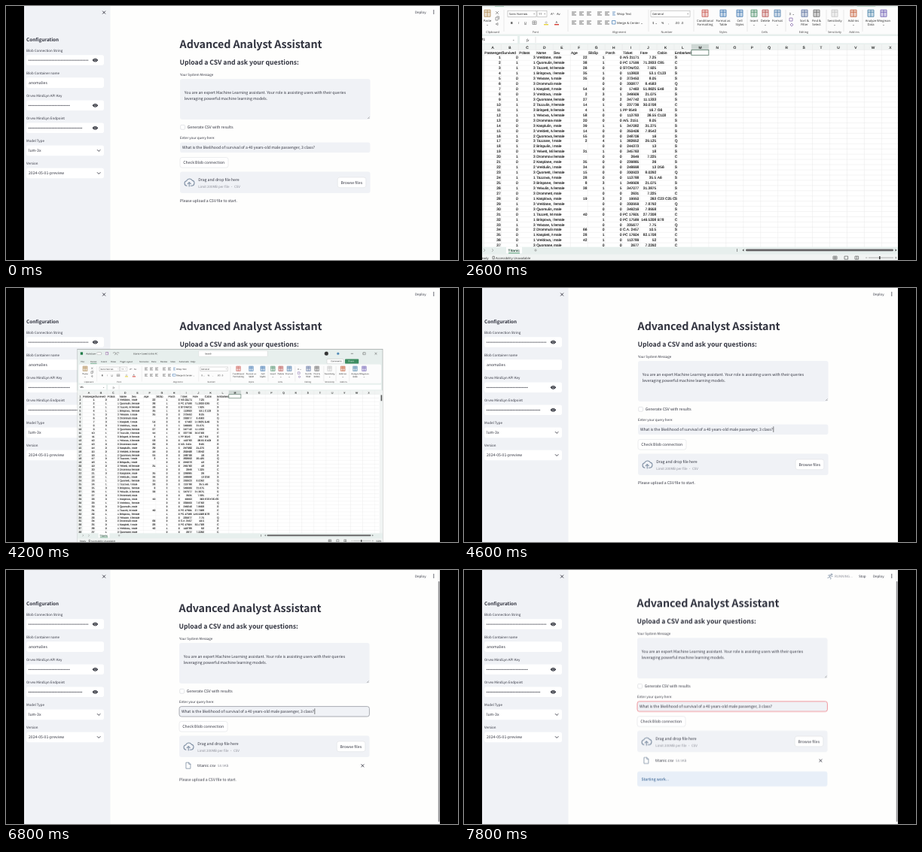
Write an HTML page that moves like this. It is 600 px wide and 338 px high and loops after 8000 ms.

```html
<!DOCTYPE html>
<html lang="en">
<head>
<meta charset="utf-8">
<title>Analyst assistant demo</title>
<style>
html, body { margin: 0; width: 100%; height: 100%; overflow: hidden; background: #000; }
svg { display: block; width: 100%; height: 100%; }
text { white-space: pre; text-rendering: geometricPrecision; }
#app { font-family: "Noto Sans CJK SC", "Noto Sans CJK JP", "Noto Sans CJK", "Open Sans", sans-serif; font-size: 5.14px; fill: #31333f; }
#app .h1 { font-size: 14.25px; font-weight: 700; letter-spacing: -.005em; }
#app .h3 { font-size: 8.65px; font-weight: 600; }
#app .h4 { font-size: 6.35px; font-weight: 600; }
#app .sm { font-size: 4.48px; }
#app .dim { font-size: 4.48px; fill: #8b8d97; }
.field { fill: #f0f2f6; }
.btn { fill: #fff; stroke: #d9dade; stroke-width: .5; }
.ico { fill: none; stroke: #31333f; stroke-width: .9; stroke-linecap: round; stroke-linejoin: round; }
.soft { stroke: #8191a5; stroke-width: .8; }

#excel { font-family: "Liberation Sans", Arial, sans-serif; font-size: 4.8px; fill: #111; transform-origin: 281px 339.5px; }
#excel .cells text { stroke: #111; stroke-width: .12; }
#excel .ui { font-family: "Open Sans", sans-serif; font-size: 4.1px; fill: #222; }
#excel .grp { font-family: "Open Sans", sans-serif; font-size: 3.9px; fill: #444; }
#excel .mid { text-anchor: middle; }
#excel .end { text-anchor: end; }

.t { animation: 8s -10ms step-end infinite; }
#main { animation-name: main; }
#link1 { animation-name: link1; }
#link2 { animation-name: link2; }
#excel { animation-name: excel; }
#caret { animation-name: caret; }
#ghost { animation-name: ghost; }
#deny { animation-name: deny; }
#bar, #file { animation-name: loaded; }
#hint { animation-name: hint; }
#ring { animation-name: ring; }
#run { animation-name: run; }
#info { animation-name: info; }
@keyframes main { 0% { transform: none; } 82.5% { transform: translate(-1px, 0); } 97.5%, 100% { transform: translate(-1px, -6.7px); } }
@keyframes link1 { 0%, 20%, 100% { opacity: 0; } 17.5% { opacity: .6; } }
@keyframes link2 { 0%, 25%, 100% { opacity: 0; } 22.5% { opacity: .6; } }
@keyframes excel {
  0%, 57.5%, 100% { opacity: 0; transform: none; }
  32.5% { opacity: 1; transform: none; }
  47.5% { opacity: 1; transform: scale(.96); }
  50% { opacity: 1; transform: scale(.85); }
  52.5% { opacity: 1; transform: scale(.704); }
  55% { opacity: .5; transform: scale(.5); }
}
@keyframes caret { 0%, 62.5%, 90%, 100% { opacity: 0; } 57.5%, 85% { opacity: 1; } }
@keyframes ghost {
  0%, 80%, 100% { opacity: 0; transform: none; }
  67.5% { opacity: 1; transform: none; }
  75% { opacity: 1; transform: translate(-22px, 30px); }
  77.5% { opacity: 1; transform: translate(-50px, 64px); }
}
@keyframes deny { 0% { opacity: 1; } 77.5%, 100% { opacity: 0; } }
@keyframes loaded { 0% { opacity: 0; } 82.5%, 100% { opacity: 1; } }
@keyframes hint { 0% { opacity: 1; transform: none; } 82.5% { opacity: 1; transform: translate(0, 19.7px); } 97.5%, 100% { opacity: 0; } }
@keyframes ring { 0% { stroke: transparent; } 85% { stroke: #9698a0; } 92.5%, 100% { stroke: #ee7b83; } }
@keyframes run { 0% { opacity: 0; } 95%, 100% { opacity: 1; } }
@keyframes info { 0% { opacity: 0; } 97.5%, 100% { opacity: 1; } }
</style>
</head>
<body>
<svg viewBox="0 0 600 338" preserveAspectRatio="none">
  <defs>
    <clipPath id="nameCol"><rect x="95.4" y="58" width="22.6" height="264"/></clipPath>
    <g id="chain" class="ico" style="stroke:#777985;stroke-width:.8">
      <path d="M-.6 .9a1.5 1.5 0 0 1 0-2.1l1-1a1.5 1.5 0 0 1 2.1 2.1l-.5.5M.6-.9a1.5 1.5 0 0 1 0 2.1l-1 1a1.5 1.5 0 0 1-2.1-2.1l.5-.5"/>
    </g>
  </defs>
  <g id="app">
    <rect x="24" width="552" height="338" fill="#fefefd"/>
    <rect x="24" width="114.5" height="338" fill="#f0f2f6"/>
    <path class="ico" d="M128.4 6.9l3.4 3.4m0-3.4l-3.4 3.4"/>
    <text class="h4" x="27" y="47.4">Configuration</text>
    <g id="fields"></g>

    <text class="sm" x="543" y="9.7">Deploy</text>
    <path d="M567.8 6v4.2" stroke="#31333f" stroke-width="1.3" stroke-linecap="round" stroke-dasharray="0 2"/>
    <g id="run" class="t">
      <g class="ico soft"><circle cx="487.8" cy="5.9" r=".9"/><path d="M483.5 7.2l2.4-.4 1.4 1.4 1.9.2M486 7l-.8 2.4 1.8.8-.3 1.9M485 9.6l-2.2.9"/></g>
      <text x="492" y="9.7" class="dim">RUNNING...</text>
      <text x="524" y="9.7" class="sm">Stop</text>
    </g>

    <g id="main" class="t">
      <g transform="translate(220.5 51)"><use id="link1" class="t" href="#chain"/></g>
      <g transform="translate(220.5 75)"><use id="link2" class="t" href="#chain"/></g>
      <text class="h1" x="230.6" y="56.2">Advanced Analyst Assistant</text>
      <text class="h3" x="230.6" y="78.3">Upload a CSV and ask your questions:</text>
      <text class="sm" x="231" y="92.6">Your System Message</text>
      <rect class="field" x="231" y="97" width="252.5" height="54" rx="3"/>
      <text x="236.8" y="116.5">You are an expert Machine Learning assistant. Your role is assisting users with their queries</text>
      <text x="236.8" y="124.7">leveraging powerful machine learning models.</text>
      <path d="M480 150l2.6-2.6m-1 2.6l1-1" stroke="#777" stroke-width=".5"/>
      <rect class="btn" x="231.7" y="158.4" width="5.8" height="5.8" rx="1.2" style="stroke:#c9cad0"/>
      <text x="240.8" y="163.2">Generate CSV with results</text>
      <text class="sm" x="231" y="177.1">Enter your query here:</text>
      <rect id="ring" class="field t" x="231" y="181.6" width="252.4" height="13.4" rx="2.8" stroke-width=".8"/>
      <text x="233.9" y="190.2">What is the likelihood of survival of a 40 years-old male passenger, 3 class?</text>
      <path id="caret" class="t" d="M410.8 184.3v7.6" stroke="#222" stroke-width=".6"/>
      <rect class="btn" x="231" y="201.5" width="64" height="13.6" rx="2.8"/>
      <text x="235.3" y="210.1">Check Blob connection</text>
      <rect class="field" x="231" y="220.6" width="252.5" height="28.4" rx="3"/>
      <path class="ico soft" style="stroke-width:1.1" d="M240 239.2a3.3 3.3 0 0 1-.4-6.5a4.2 4.2 0 0 1 7.6-.6a3.6 3.6 0 0 1-.6 7.1h-1.4M243.2 240v-5.2m-2 1.8l2-2 2 2"/>
      <text x="255.3" y="232.9">Drag and drop file here</text>
      <text class="dim" x="255.3" y="241.8">Limit 200MB per file • CSV</text>
      <rect class="btn" x="440.2" y="228" width="37.6" height="13.7" rx="2.8"/>
      <text x="444.4" y="236.7">Browse files</text>
      <g id="file" class="t">
        <path class="ico soft" d="M240.3 256.2h3.4l2.2 2.2v5.8h-5.6zM243.7 256.2v2.2h2.2"/>
        <text x="255" y="262">titanic.csv</text>
        <text class="dim" x="282" y="262">58.9KB</text>
        <path class="ico" d="M472.8 258.8l3.2 3.2m0-3.2l-3.2 3.2"/>
      </g>
      <text id="hint" class="t" x="231" y="261.4">Please upload a CSV file to start.</text>
      <g id="info" class="t">
        <rect x="231" y="274.7" width="252.4" height="20" rx="3" fill="#e8eff8"/>
        <text x="236.6" y="286.6" fill="#1d4f85">Starting work...</text>
      </g>
    </g>

    <g id="bar" class="t">
      <rect x="573.2" width="2.8" height="338" fill="#f3f3f3"/>
      <rect x="573.8" y="15" width="1.7" height="320" rx=".8" fill="#8d8d90"/>
    </g>
    <g id="ghost" class="t">
      <rect x="464.3" y="144.3" width="36.2" height="36.2" fill="#fff" fill-opacity=".93" stroke="#77787c" stroke-width=".7"/>
      <g id="deny" class="t"><path d="M486.4 172.5l-3.8 3.8m4.6-1.9a2.7 2.7 0 1 1-5.4 0a2.7 2.7 0 1 1 5.4 0" fill="none" stroke="#dd5b62" stroke-width=".9"/></g>
    </g>
  </g>
  <g id="excel" class="t"></g>
  <path d="M0 0h24v338H0zM576 0h24v338h-24z"/>
</svg>
<script>
const $ = id => document.getElementById(id);
const rect = (x, y, w, h, fill, more = '') => `<rect x="${x}" y="${y}" width="${w}" height="${h}" fill="${fill}" ${more}/>`;
const text = (x, y, s, cls = '') => `<text x="${x}" y="${y}" class="${cls}">${s}</text>`;
const line = (d, color, w = .5) => `<path d="${d}" fill="none" stroke="${color}" stroke-width="${w}"/>`;
const range = n => [...Array(n).keys()];

// Sidebar: a number is the width of a masked value, "v" marks a select box
$('fields').innerHTML = [
  ['Blob Connection String', 79],
  ['Blob Container name', 'anomalies'],
  ['Orvex MindLyn API Key', 56],
  ['Orvex MindLyn Endpoint', 72],
  ['Model Type', 'lum-3x', 'v'],
  ['Version', '2024-05-01-preview', 'v']
].map(([label, value, kind], i) => {
  const y = 72 + 30.1 * i;
  let s = text(27, y - 11.4, label, 'sm') + rect(27, y - 6.8, 103, 13.6, '#fff', 'rx="2.8"');
  if (typeof value == 'number') {
    s += `<path d="M30.6 ${y + .2}h${value - 1}" stroke="#31333f" stroke-width="1.3" stroke-linecap="round" stroke-dasharray="0 2.05"/>`
      + `<path d="M114.6 ${y}q3.8-5 7.6 0q-3.8 5-7.6 0" fill="#22242e"/><circle cx="118.4" cy="${y}" r="1.4" fill="#22242e" stroke="#fff" stroke-width=".6"/>`;
  } else s += text(30, y + 1.9, value);
  if (kind) s += `<path class="ico" d="M121.3 ${y - .9}l1.9 1.9 1.9-1.9"/>`;
  return s;
}).join('');

// Spreadsheet geometry
const COL = 22.95, ROW = 6.94, LEFT = 26.5, TOP = 58.4;
const CHROME = '#e7efed', HEADER = '#f1f4f3';
const colX = i => LEFT + COL * i;
const rowY = i => TOP + ROW * i;

function titleBar() {
  const tabs = 'File,Home,Insert,Draw,Page Layout,Formulas,Data,Review,View,Automate,Help'.split(',');
  const at = [23, 41, 61, 79, 97, 133, 156, 173, 192, 208, 230];
  return rect(16.6, -26.6, 575.4, 365.6, CHROME, 'stroke="#8f9493" stroke-width=".6"')
    + rect(22, -21.5, 5, 5, '#1d7a46')
    + text(33, -17.4, 'AutoSave', 'ui') + rect(53, -21.3, 9, 4.6, '#fff', 'rx="2.3" stroke="#777" stroke-width=".5"')
    + rect(70, -21.3, 4.6, 4.6, 'none', 'stroke="#8a4a9c" stroke-width=".7"')
    + line('M84-19a2.3 2.3 0 1 1 2 2.4M95-19a2.3 2.3 0 1 0-2 2.4', '#666', .7)
    + text(122, -17.4, 'titanic • Saved to this PC', 'ui')
    + rect(245, -24.4, 130, 11.2, '#fff', 'rx="1.5" stroke="#c8c8c8" stroke-width=".5"') + text(257, -17.4, 'Search', 'ui')
    + '<circle cx="486" cy="-18.8" r="3.6" fill="#333"/><circle cx="508" cy="-18.8" r="2.2" fill="#4c86b5"/>'
    + line('M532-18.8h4.6M555-21h4.4v4.4h-4.4zM577-21l4.4 4.4m0-4.4l-4.4 4.4', '#333', .6)
    + tabs.map((s, i) => text(at[i], -2.4, s, 'ui')).join('') + rect(41, -.6, 12, .9, '#1d7a46')
    + rect(487, -8.6, 31, 8.8, '#fff', 'rx="1.2" stroke="#bbb" stroke-width=".5"') + text(494, -2.8, 'Comments', 'ui')
    + rect(521, -8.6, 26, 8.8, '#3c8c60', 'rx="1.2"') + `<text x="527" y="-2.8" class="ui" style="fill:#fff">Share</text>`;
}

function ribbon() {
  const big = [
    [31, 'Paste', '', '#b08a52'], [320, 'Conditional', 'Formatting', '#c9574f'], [344, 'Format as', 'Table', '#3d78b2'], [366, 'Cell', 'Styles', '#3d78b2'],
    [385, 'Insert', '', '#4b8f69'], [400, 'Delete', '', '#b8504d'], [416, 'Format', '', '#4f7fae'],
    [452, 'Sort &amp;', 'Filter', '#5a6f9e'], [468, 'Find &amp;', 'Select', '#666'], [492, 'Sensitivity', '', '#c5c5c5'],
    [517, 'Add-ins', '', '#c65c36'], [540, 'Analyze', 'Data', '#4580a8'], [557, 'Wingman', '', '#6d5bb4']
  ];
  const groups = [[38, 'Clipboard'], [95, 'Font'], [206, 'Alignment'], [269, 'Number'], [344, 'Styles'], [399, 'Cells'], [451, 'Editing'], [492, 'Sensitivity'], [518, 'Add-ins']];
  const box = (x, w, s) => rect(x, 6.2, w, 8.2, '#fff', 'stroke="#9a9a9a" stroke-width=".5"') + text(x + 2, 11.8, s, 'ui') + text(x + w - 4.5, 11.4, '⌄', 'ui');
  let s = rect(19, 1.5, 570, 36, '#fcfcfc', 'rx="2.5"');
  for (const [x, a, b, color] of big)
    s += rect(x - 4, 5.2, 8, 9, color, 'fill-opacity=".25"') + line(`M${x - 4} 5.2h8v9h-8zm0 3h8m-4-3v9`, color, .8)
      + text(x, 21, a, 'ui mid') + text(x, 25.8, b || '⌄', 'ui mid');
  for (const [x, name] of groups) s += text(x, 35.6, name, 'grp mid');
  for (const x of [53, 138, 245, 305, 376, 427, 481, 504, 529]) s += line(`M${x} 5v29`, '#d6d6d6', .5);
  s += line('M42 7l4 4m0-4l-4 4M42 15h3v4h-3zm1.5-1.2h3v4M42 24l3-1.5v3z', '#666', .6)
    + box(58, 38, 'Sans Narrow') + box(97, 13, '11') + text(115, 11.8, 'A^', 'ui') + text(123, 11.8, 'Av', 'ui')
    + '<text x="62" y="23.6" class="ui" font-weight="700">B</text><text x="72" y="23.6" class="ui" font-style="italic">I</text>'
    + text(80, 23.6, 'U', 'ui') + line('M80 24.6h3', '#333', .4)
    + line('M91 20h5v4.5h-5zm2.5 0v4.5m-2.5-2.2h5', '#555', .5) + rect(106, 24, 6, 1.4, '#e8d33a') + rect(120, 24, 6, 1.4, '#d63c32')
    + text(107.5, 23.4, '◇', 'ui') + text(121.4, 23.4, 'A', 'ui');
  for (const y of [8, 20]) for (const x of [143, 153, 163, 177, 187])
    s += line(`M${x} ${y}h6m-6 2h4m-4 2h6`, '#444', .7);
  return s + text(203, 11.8, 'Wrap Text', 'ui') + text(203, 23.6, 'Merge &amp; Center ⌄', 'ui')
    + line('M197 8h4m-4 2h3m-3 2h4M196.5 19.5h4.5v4.5h-4.5z', '#3d78b2', .7)
    + box(248, 52, 'General') + text(250, 23.6, '$ ⌄', 'ui') + text(262, 23.6, '%', 'ui') + text(271, 23.6, ',', 'ui') + text(280, 23.6, '.00  .0', 'ui')
    + text(432, 11.8, 'Σ ⌄', 'ui') + line('M432 16h4v4h-4zM433 25l2-2 2 2-2 2z', '#7a5ca5', .7);
}

function passengers() {
  const survived = '0111000011110001010101110100100110001';
  const pclass = '3131331332313332323322313331331132113';
  const sex = 'mfffmmmmffffmmffmmffmmfmffmmfmmffmmmm';
  const sibsp = '1101000301100100401000003103000100110';
  const parch = '0000000120100500100000001502000000000';
  const port = 'SCSSSQSSSCSSSSSSQSSCSSQSSSCSQSCCQSCSC';
  const ages = '22,38,26,35,35,,54,2,27,14,4,58,20,39,14,55,2,,31,,35,34,15,28,8,38,,19,,,40,,,66,28,42,'.split(',');
  const tickets = ('A/5 21171,PC 17599,STON/O2.,113803,373450,330877,17463,349909,347742,237736,PP 9549,113783,A/5. 2151,347082,350406,'
    + '248706,382652,244373,345763,2649,239865,248698,330923,113788,349909,347077,2631,19950,330959,349216,PC 17601,PC 17569,335677,C.A. 2457,PC 17604,113789,2677').split(',');
  const fares = ('7.25,71.2833,7.925,53.1,8.05,8.4583,51.8625,21.075,11.1333,30.0708,16.7,26.55,8.05,31.275,7.8542,16,29.125,13,18,7.225,26,13,'
    + '8.0292,35.5,21.075,31.3875,7.225,263,7.8792,7.8958,27.7208,146.5208,7.75,10.5,82.1708,52,7.2292').split(',');
  const cabins = { 2: 'C85', 4: 'C123', 7: 'E46', 11: 'G6', 12: 'C103', 22: 'D56', 24: 'A6', 28: 'C23 C25 C', 32: 'B78' };
  const heads = ['Vreld', 'Quom', 'Tazz', 'Brisp', 'Yelv', 'Dromm', 'Kaspl'], tails = ['ane', 'ulin', 'ett', 'ova'];
  return range(37).map(i => {
    const male = sex[i] == 'm';
    const name = heads[i % 7] + tails[i % 4] + (male ? ', Mr.' : ', Miss');
    return [i + 1, survived[i], pclass[i], name, male ? 'male' : 'female', ages[i], sibsp[i], parch[i], tickets[i], fares[i], cabins[i + 1] || '', port[i]];
  });
}

function sheet() {
  const rows = [['Passenger', 'Survived', 'Pclass', 'Name', 'Sex', 'Age', 'SibSp', 'Parch', 'Ticket', 'Fare', 'Cabin', 'Embarked'], ...passengers()];
  let s = rect(19, 40, 52, 9.4, '#fff') + text(21.5, 46.4, 'M1') + text(64, 46.4, '⌄', 'ui')
    + rect(74, 40, 515, 9.4, '#fff') + line('M95 41v8', '#bbb', .4)
    + '<text x="83" y="46.6" font-style="italic" font-family="Liberation Serif, serif">fx</text>'
    + rect(16.6, 51, 575.4, 270, HEADER) + rect(LEFT, TOP, 559.5, 263, '#fff');
  let grid = '';
  for (const i of range(25)) grid += `M${colX(i)} 51V321`;
  for (const i of range(38)) grid += `M16.6 ${rowY(i)}H585`;
  s += line(grid, '#e2e3e2', .4) + rect(colX(12), 51, COL, 7.4, '#cfd8d5') + '<g class="cells">';
  for (const i of range(24)) s += text(colX(i) + 11.5, 56.8, String.fromCharCode(65 + i), 'mid');
  rows.forEach((cells, r) => {
    const y = rowY(r) + 5.1;
    s += text(21.5, y, r + 1, 'mid');
    cells.forEach((v, c) => {
      const num = /^[\d.]+$/.test(v);
      const cell = text(num ? colX(c + 1) - .8 : colX(c) + .8, y, v, num ? 'end' : '');
      s += c == 3 ? `<g clip-path="url(#nameCol)">${cell}</g>` : cell;
    });
  });
  return s + '</g>' + rect(colX(12), TOP, COL, ROW, 'none', 'stroke="#5c7d6c" stroke-width=".8"')
    + rect(588.6, 59.5, 2.4, 11, '#555');
}

function footer() {
  return rect(16.6, 320.6, 575.4, 9.8, CHROME) + rect(16.6, 330.4, 575.4, 8.4, HEADER) + rect(56, 320.6, 21, 8.6, '#fff')
    + '<text x="58.6" y="326.6" font-weight="700" style="fill:#1f4a36">Titanic</text>' + rect(59, 328.4, 15, .8, '#1d7a46')
    + line('M26 323l2 2-2 2M37 323l2 2-2 2M93 325h4m-2-2v4', '#777', .5) + rect(362, 323, .8, 4, '#777')
    + '<path d="M371.5 323.2v3.4l-2-1.7zM572.5 323.2v3.4l2-1.7z" fill="#444"/>' + rect(374, 323.6, 196, 2.6, '#666466', 'rx="1.3"')
    + text(21, 336.6, 'Ready', 'ui') + text(42, 336.6, 'Accessibility Unavailable', 'ui')
    + line('M38 333.2h2.4v3.4H38zM490 333h5v4h-5zm0 2h5m-2.5-2v4M505 333h4.6v4H505zM519 333h4.6v4H519zm2.3 0v4', '#444', .6)
    + line('M533 335h2.4M537 335h33m2 0h2.6m-1.3-1.3v2.6', '#666', .5) + rect(551, 333, 1.6, 4, '#444') + text(579, 336.6, '100%', 'ui');
}

$('excel').innerHTML = titleBar() + ribbon() + sheet() + footer();
</script>
</body>
</html>
```
